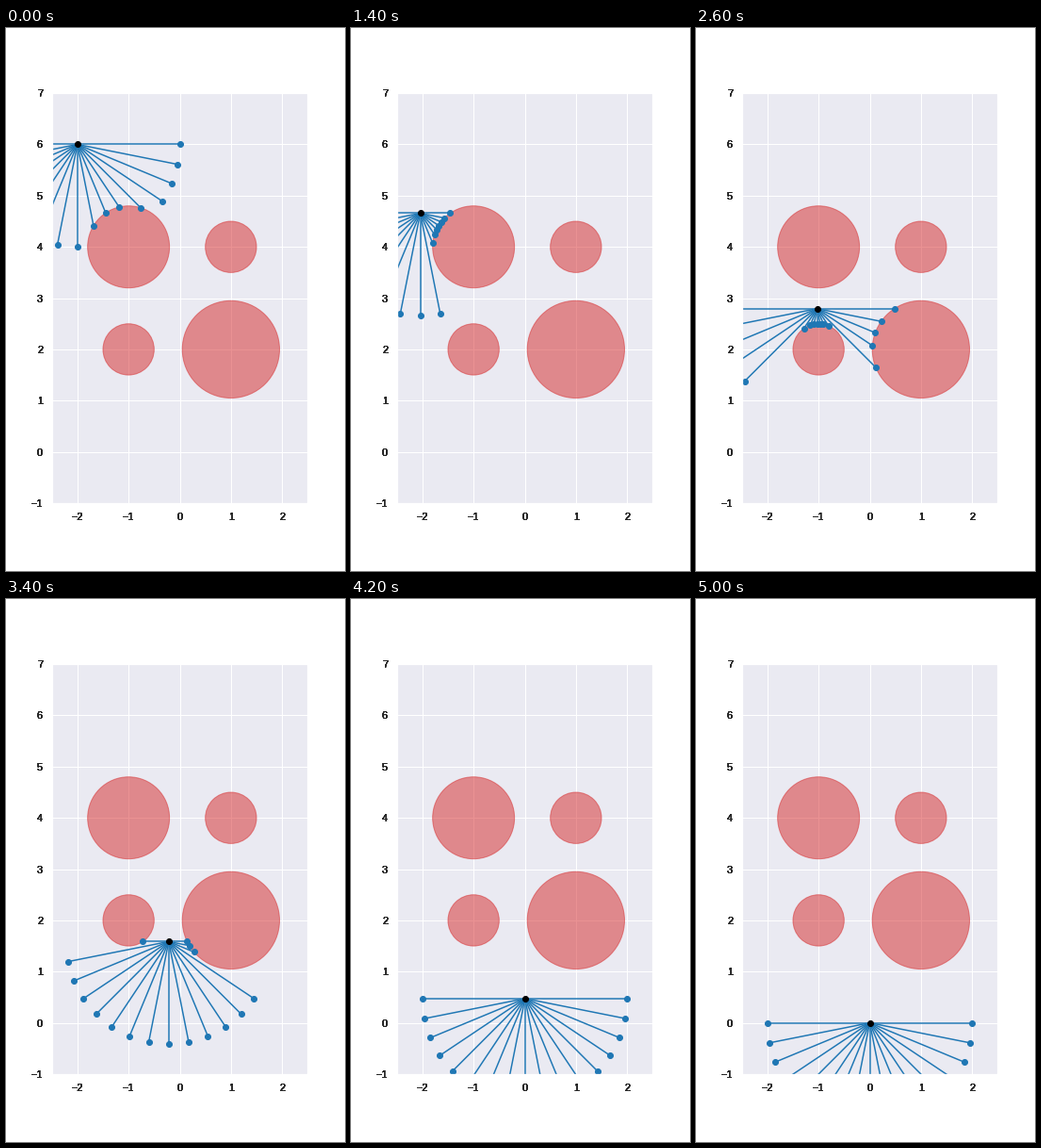
Write a matplotlib script that moves like this. It is 360 px wide and 576 px high and loops after 5100 ms.

```python
import numpy as np
import matplotlib.pyplot as plt
from matplotlib.animation import FuncAnimation

FRAMES, INTERVAL = 51, 100
REACH = 2.0
ANGLES = -np.arange(17) * np.pi / 16
LABEL_LAYERS = 8
OBSTACLES = [(-1, 4, 0.8), (1, 4, 0.5), (-1, 2, 0.5), (1, 2, 0.95)]

# Key points of the robot path: frame, x, y
PATH = np.array([
    (0, -2, 6), (6, -2.046, 5.725), (14, -2.041, 4.657),
    (20, -1.80, 3.67), (26, -1.028, 2.795), (30, -0.50, 2.219),
    (36, -0.128, 1.281), (42, 0.005, 0.475), (50, 0, 0),
])
TIMES, POINTS = PATH[:, 0], PATH[:, 1:]
SLOPES = np.gradient(POINTS, TIMES, axis=0)
SLOPES[[0, -1]] = 0

plt.rcParams.update({
    "font.family": "Liberation Sans",
    "font.size": 11,
    "axes.facecolor": "#eaeaf2",
    "axes.edgecolor": "white",
    "axes.linewidth": 1.25,
    "axes.axisbelow": True,
    "grid.color": "white",
    "grid.linewidth": 1,
})


def position(frame):
    """Cubic Hermite interpolation between the key points."""
    i = min(np.searchsorted(TIMES, frame, side="right") - 1, len(TIMES) - 2)
    h = TIMES[i + 1] - TIMES[i]
    s = (frame - TIMES[i]) / h
    ease = s * s * (3 - 2 * s)
    return ((1 - ease) * POINTS[i] + ease * POINTS[i + 1]
            + h * s * (1 - s) ** 2 * SLOPES[i]
            - h * s * s * (1 - s) * SLOPES[i + 1])


def ray_length(start, direction):
    """Distance to the first obstacle, limited to the sensor reach."""
    length = REACH
    for cx, cy, radius in OBSTACLES:
        to_center = np.array([cx, cy]) - start
        along = to_center @ direction
        disc = along**2 - to_center @ to_center + radius**2
        if disc >= 0 and along > 0:
            length = min(length, max(along - np.sqrt(disc), 0))
    return length


def style_axes(ax):
    ax.set(xlim=(-2.5, 2.5), ylim=(-1, 7), aspect="equal",
           xticks=range(-2, 3), yticks=range(-1, 8))
    ax.tick_params(length=0, pad=9.5, labelcolor="#262626")


fig, ax = plt.subplots(figsize=(5, 8), dpi=72)
fig.subplots_adjust(left=0.125, right=0.9, bottom=0.125, top=0.88)
style_axes(ax)
ax.grid(True)

# Stacked copies of the tick labels harden their soft edges
for _ in range(LABEL_LAYERS):
    style_axes(fig.add_subplot(frameon=False))

for cx, cy, radius in OBSTACLES:
    ax.add_patch(plt.Circle((cx, cy), radius, color="tab:red", alpha=0.5, lw=1))

rays = [ax.plot([], [], "o-", color="tab:blue", lw=1.5, ms=6, markevery=[1])[0]
        for _ in ANGLES]
robot, = ax.plot([], [], "o", color="black", ms=6)


def update(frame):
    start = position(frame)
    for ray, angle in zip(rays, ANGLES):
        direction = np.array([np.cos(angle), np.sin(angle)])
        end = start + ray_length(start, direction) * direction
        ray.set_data(*zip(start, end))
    robot.set_data([start[0]], [start[1]])
    return [*rays, robot]


anim = FuncAnimation(fig, update, frames=FRAMES, interval=INTERVAL,
                     repeat=True, repeat_delay=0)
plt.show()
```
